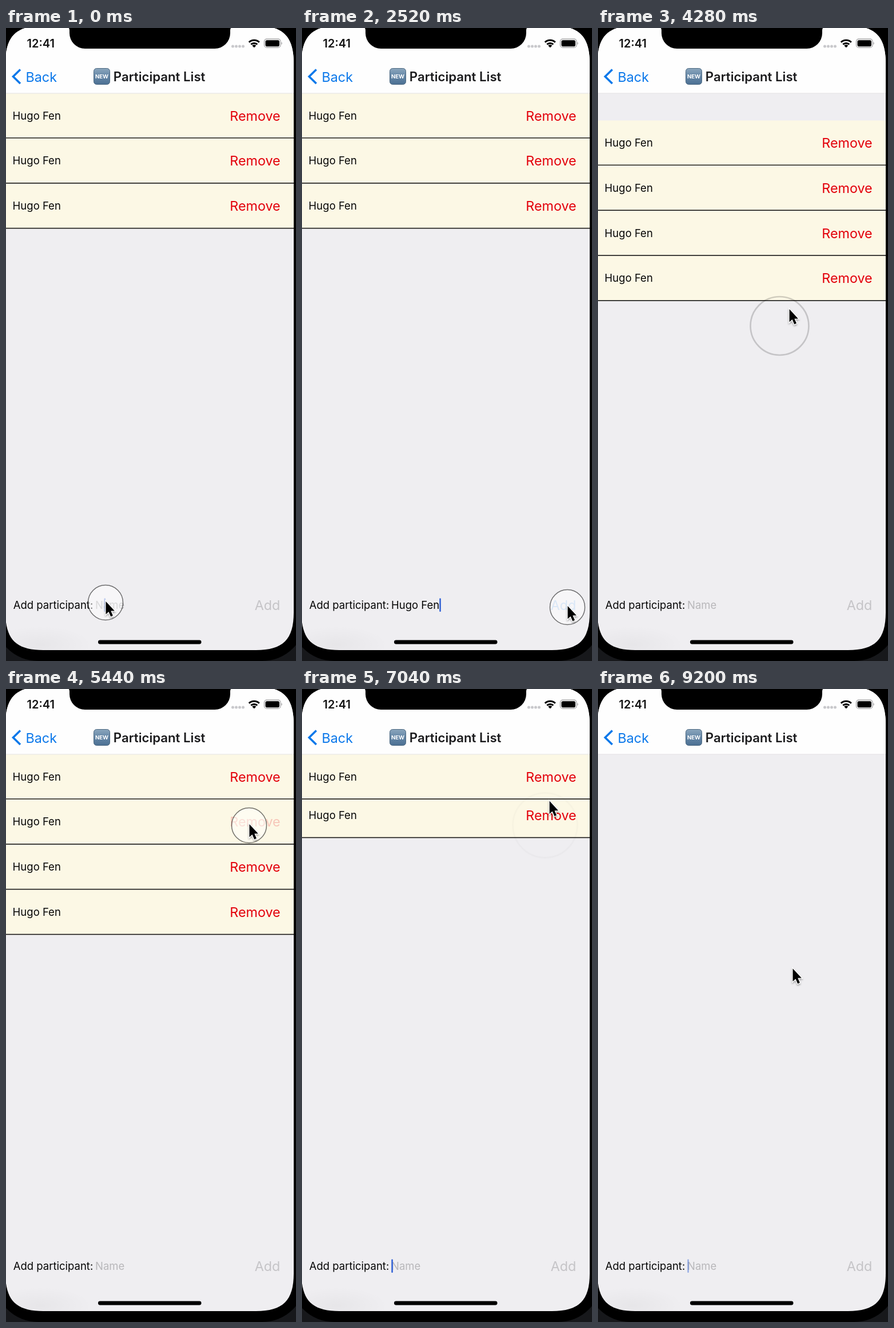
An HTML page for the animation above (9240 ms loop, 507x1105 px).

```html
<!DOCTYPE html>
<html lang="en">
<head>
<meta charset="utf-8">
<title>Participant List</title>
<style>
  html, body { margin: 0; width: 100%; height: 100%; overflow: hidden; background: #000; }
  svg { display: block; width: 507px; height: 1105px; font-family: Inter, "Liberation Sans", sans-serif; }
  text { white-space: pre; }
  .body { font-size: 18.5px; fill: #050505; }
  .action { font-size: 23.3px; }
  .remove { fill: #e3000b; text-anchor: middle; }
</style>
</head>
<body>
<svg viewBox="0 0 507 1105">
  <defs>
    <clipPath id="screen">
      <path d="M-1 62C-1 14.6 17.6 -4 65 -4H437C484.4 -4 503 14.6 503 62V1020C503 1067.4 484.4 1086 437 1086H65C17.6 1086 -1 1067.4 -1 1020Z"/>
    </clipPath>
    <clipPath id="list"><rect x="0" y="114" width="503" height="860"/></clipPath>
    <linearGradient id="badge" x2="0" y2="1">
      <stop offset="0" stop-color="#8ba6bd"/>
      <stop offset=".5" stop-color="#6486a6"/>
      <stop offset="1" stop-color="#4c7093"/>
    </linearGradient>
    <radialGradient id="shade">
      <stop offset="0" stop-color="#000" stop-opacity=".035"/>
      <stop offset="1" stop-color="#000" stop-opacity="0"/>
    </radialGradient>
    <filter id="soft" x="-50%" y="-50%" width="200%" height="200%">
      <feDropShadow dx="0" dy="2" stdDeviation="1.6" flood-opacity=".35"/>
    </filter>
  </defs>

  <rect width="507" height="1105" fill="#17181b"/>
  <rect x="-20" y="-100" width="544" height="1205" rx="76"/>

  <g clip-path="url(#screen)">
    <rect x="-1" y="-8" width="505" height="1095" fill="#efeef1"/>
    <ellipse cx="60" cy="1076" rx="90" ry="32" fill="url(#shade)"/>
    <g id="rows" clip-path="url(#list)"></g>

    <rect x="-1" y="-8" width="505" height="122" fill="#fefefe"/>
    <rect y="113.5" width="503" height="1" fill="#e3e2e4"/>

    <text x="36.5" y="34" font-size="20" font-weight="600" fill="#111">12:41</text>
    <g fill="#c9c9cc">
      <circle cx="396.5" cy="32" r="2.5"/><circle cx="402.5" cy="32" r="2.5"/>
      <circle cx="408.5" cy="32" r="2.5"/><circle cx="414.5" cy="32" r="2.5"/>
    </g>
    <g fill="none" stroke="#000" stroke-width="3">
      <path d="M424.8 24.8A13 13 0 0 1 442.8 24.8"/>
      <path d="M428.3 28.6A8 8 0 0 1 439.3 28.6"/>
    </g>
    <path d="M433.8 34.2L430.3 30.7A5 5 0 0 1 437.3 30.7Z"/>
    <rect x="451.5" y="19.2" width="28.5" height="15" rx="4.5" fill="none" stroke="#99999b" stroke-width="1.2"/>
    <rect x="453.5" y="21.2" width="24.5" height="11" rx="2.8"/>
    <path d="M481.5 24.2Q484 26.7 481.5 29.2Z" fill="#99999b"/>

    <path d="M25 72.5L12.5 84.7L25 97" fill="none" stroke="#0b78ea" stroke-width="3.6"/>
    <text x="34.5" y="93.5" class="action" fill="#0b78ea">Back</text>
    <rect x="153.5" y="70.5" width="28" height="28" rx="5" fill="url(#badge)" stroke="#4b6780"/>
    <text x="167.5" y="88.2" font-size="9.6" font-weight="700" fill="#fff" text-anchor="middle">NEW</text>
    <text x="187.8" y="92.7" font-size="22.2" font-weight="600" fill="#1a1a1c">Participant List</text>

    <text x="12.7" y="1013.7" class="body">Add participant:</text>
    <text id="field" x="156" y="1013.7" class="body"></text>
    <rect id="caret" y="995.5" width="2.6" height="23.5" rx="1" fill="#3564d6"/>
    <text id="add" x="457" y="1015.8" class="action" text-anchor="middle">Add</text>
    <rect x="161" y="1068.6" width="180.5" height="6.8" rx="3.4"/>
    <circle id="ring" stroke="#000"/>
  </g>

  <path d="M103 -4A8 8 0 0 1 111 4V9A27 27 0 0 0 138 36H365A27 27 0 0 0 392 9V4A8 8 0 0 1 400 -4Z"/>
  <path id="cursor" d="M.5 1V23.5L5.5 19L9.2 27.4L12.9 25.8L9.3 17.6H15.9Z" fill="#000" stroke="#fff"
        stroke-width="2.4" paint-order="stroke" filter="url(#soft)"/>
</svg>
<script>
const LOOP = 9240, WIDTH = 503, TOP = 114, PITCH = 78.8;
const NAME = 'Hugo Fen', PLACEHOLDER = 'Name';
const TYPE_START = 700, TYPE_STEP = 140, SUBMIT = 2540;
const LAYOUT_LAG = 12;

// Lifetimes of the rows: entering and leaving times
const people = [
  { out: 7638 },
  { out: 5533 },
  { out: 6710 },
  { in: SUBMIT, out: 8590 }
];

const presses = [
  { down: -200, up: 120 },
  { down: 2400, up: 2530, add: true },
  { down: 3560, up: 4072, drag: true },
  { down: 5290, up: 5525, row: 1 },
  { down: 6560, up: 6700, row: 2 },
  { down: 7500, up: 7630, row: 0 },
  { down: 8450, up: 8582, row: 3 }
];

// Pointer stops: time, x, y
const track = [
  [0, 174, 1000], [1500, 174, 1000], [1900, 440, 1018], [2250, 464, 1008], [2930, 464, 1008],
  [3480, 330, 231], [3640, 330, 231], [4072, 317.5, 517], [4280, 334, 490], [5050, 425, 235],
  [6800, 425, 235], [7250, 438, 162], [7640, 438, 162], [7800, 438, 218], [7960, 438, 240],
  [8350, 438, 170], [8600, 438, 170], [9150, 340, 487], [LOOP, 340, 487]
];

const $ = id => document.getElementById(id);
const clamp = (v, lo = 0, hi = 1) => Math.min(hi, Math.max(lo, v));
const mix = (a, b, p) => a + (b - a) * p;
const ramp = (t, from, length) => clamp((t - from) / length);
const inOut = u => u < .5 ? 2 * u * u : 1 - 2 * (1 - u) ** 2;

function set(el, attrs) {
  for (const key in attrs) el.setAttribute(key, attrs[key]);
}

function make(tag, attrs, parent, text = '') {
  const el = document.createElementNS('http://www.w3.org/2000/svg', tag);
  set(el, attrs);
  el.textContent = text;
  return parent.appendChild(el);
}

// Monotone cubic through the pointer stops
function slope(i, axis) {
  const a = track[i - 1], b = track[i], c = track[i + 1];
  if (!a || !c) return 0;
  const s1 = (b[axis] - a[axis]) / (b[0] - a[0]);
  const s2 = (c[axis] - b[axis]) / (c[0] - b[0]);
  return s1 * s2 > 0 ? 2 * s1 * s2 / (s1 + s2) : 0;
}

function pointer(t) {
  let i = 0;
  while (i < track.length - 2 && t >= track[i + 1][0]) i++;
  const a = track[i], b = track[i + 1], h = b[0] - a[0], u = clamp((t - a[0]) / h);
  return [1, 2].map(k =>
    mix(a[k], b[k], u * u * (3 - 2 * u)) +
    h * u * (1 - u) * ((1 - u) * slope(i, k) - u * slope(i + 1, k)));
}

// Remaining distance of a spring with stiffness 100 and damping 10
function spring(ms) {
  if (ms <= 0) return 1;
  const s = ms / 1000, w = Math.sqrt(75);
  return Math.exp(-5 * s) * (Math.cos(w * s) + 5 / w * Math.sin(w * s));
}

const rubber = d => 870 * (1 - 1 / (Math.max(0, d) * .55 / 870 + 1));

function pull(t) {
  const { down, up } = presses.find(p => p.drag);
  if (t < down) return 0;
  const start = pointer(down)[1];
  const offset = rubber(pointer(Math.min(t, up))[1] - start);
  const s = Math.max(0, t - up) / 1000 * 10.5;
  return offset * (1 + s) * Math.exp(-s);
}

const dim = (t, press) => press
  ? 1 - .8 * inOut(ramp(t, press.down, 140)) * (1 - inOut(ramp(t, press.up, 200)))
  : 1;

const rows = people.map(() => {
  const g = make('g', {}, $('rows'));
  make('rect', { width: WIDTH, height: PITCH, fill: '#fcf8e5' }, g);
  make('rect', { y: PITCH - 1.6, width: WIDTH, height: 1.6, fill: '#161616' }, g);
  make('text', { x: 11.6, y: 45.6, class: 'body' }, g, NAME);
  const remove = make('text', { x: 435.5, y: 47.6, class: 'action remove' }, g, 'Remove');
  return { g, remove };
});
// Leaving rows pass over the ones that stay
[3, 0, 2, 1].forEach(i => $('rows').append(rows[i].g));

function entering(ms) {
  const skew = ms < 210 ? mix(-45, -10, inOut(ms / 210))
    : ms < 255 ? mix(-10, 5, inOut((ms - 210) / 45))
    : mix(5, 0, inOut(ramp(ms, 255, 45)));
  return { x: -WIDTH * (1 - inOut(ramp(ms, 0, 210))), skew, opacity: inOut(ramp(ms, 0, 300)) };
}

function leaving(ms) {
  const p = inOut(ramp(ms, 0, 300));
  return { x: WIDTH * p, skew: -45 * p, opacity: 1 - p };
}

function drawRows(t) {
  const offset = pull(t);
  people.forEach((person, i) => {
    const { g, remove } = rows[i];
    const start = person.in || 0;
    g.style.display = t < start || t > person.out + 300 ? 'none' : '';
    const pose = t >= person.out ? leaving(t - person.out)
      : person.in ? entering(t - start) : { x: 0, skew: 0, opacity: 1 };
    let y = TOP + i * PITCH + offset;
    for (let j = 0; j < i; j++) y -= PITCH * (1 - spring(t - people[j].out - LAYOUT_LAG));
    const cx = WIDTH / 2, cy = PITCH / 2;
    set(g, {
      transform: `translate(${pose.x + cx} ${y + cy}) skewX(${pose.skew}) translate(${-cx} ${-cy})`,
      opacity: pose.opacity
    });
    set(remove, { opacity: dim(t, presses.find(p => p.row === i)) });
  });
}

function drawField(t) {
  const typed = t < SUBMIT ? clamp(Math.floor((t - TYPE_START) / TYPE_STEP) + 1, 0, NAME.length) : 0;
  const field = $('field');
  field.textContent = typed ? NAME.slice(0, typed) : PLACEHOLDER;
  field.style.fill = typed ? '#050505' : '#b8b7ba';
  set($('add'), {
    fill: typed ? '#0b78ea' : '#c5c4c7',
    opacity: typed ? dim(t, presses.find(p => p.add)) : 1
  });

  const beat = t % 1000;
  const blink = beat < 400 ? 1 - ramp(beat, 120, 150) : ramp(beat, 445, 65);
  const typing = t >= TYPE_START && t < 2000;
  const touched = t < 100;
  set($('caret'), {
    x: touched ? 171.5 : typed ? 156 + field.getComputedTextLength() : 156.3,
    opacity: touched ? .55 : typing ? 1 : blink
  });
}

function drawPointer(t) {
  const [x, y] = pointer(t);
  set($('cursor'), { transform: `translate(${x} ${y})` });

  const press = presses.find(p => t >= p.down && t < p.up + 400);
  $('ring').style.display = press ? '' : 'none';
  if (!press) return;
  const [cx, cy] = pointer(Math.min(t, press.up));
  const u = ramp(t, press.up, 400), p = 1 - (1 - u) ** 2;
  const shown = ramp(t, press.down, 80);
  set($('ring'), {
    cx, cy: cy + 3, r: mix(30.5, 57, p),
    fill: `rgba(255,255,255,${.45 * shown * (1 - p) ** 2})`,
    'stroke-opacity': .55 * shown * (1 - p ** 1.5),
    'stroke-width': mix(1.5, 3, p)
  });
}

function frame() {
  const t = performance.now() % LOOP;
  drawRows(t);
  drawField(t);
  drawPointer(t);
  requestAnimationFrame(frame);
}
frame();
</script>
</body>
</html>
```
